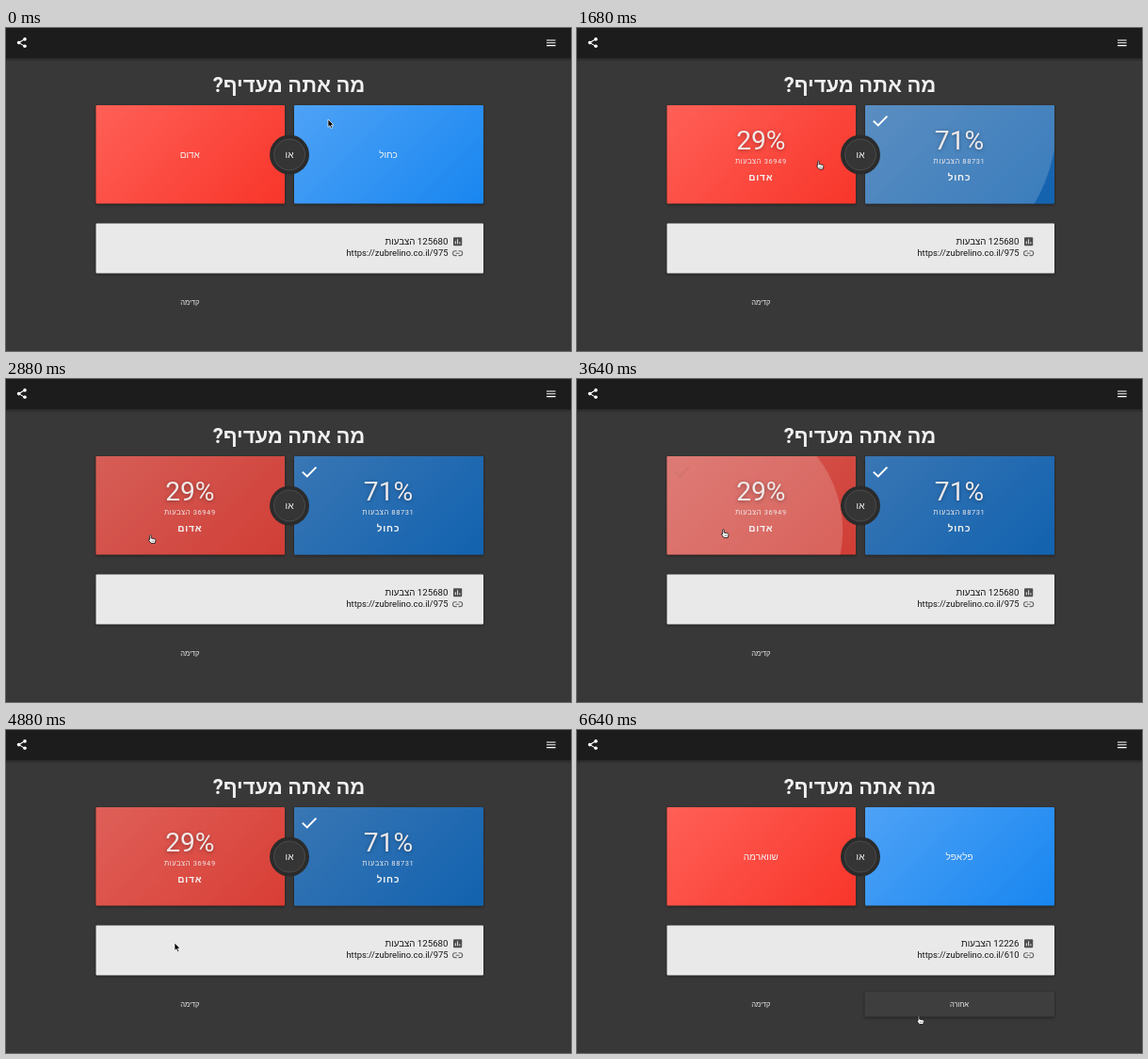
An HTML page that plays this animation: 600 px wide and 343 px high, repeating every 6.68 s.

```html
<!DOCTYPE html>
<html lang="he">
<head>
<meta charset="utf-8">
<style>
  html, body { margin: 0; width: 100%; height: 100%; overflow: hidden; background: #383838; }
  svg { display: block; width: 600px; height: 343px; }
  text { font-family: Roboto, "Open Sans", "Liberation Sans", sans-serif; fill: #fff; direction: rtl; text-anchor: middle; }
  .title { font-size: 22px; font-weight: 700; fill: #f0f0f0; }
  .plain { font-size: 10px; font-weight: 500; fill: #f4f4f4; }
  .bold { font-size: 10px; font-weight: 700; letter-spacing: .8px; fill: #f4f4f4; }
  .percent { font-size: 28.2px; direction: ltr; fill: #f0e9e9; filter: drop-shadow(0 1px 2px rgba(0,0,0,.35)); }
  .votes { font-size: 7.5px; letter-spacing: .6px; fill: #f0eaea; }
  .info { font-size: 9.7px; fill: #161616; text-anchor: start; }
  .link { font-size: 9.4px; direction: ltr; text-anchor: end; }
  .nav { font-size: 7.5px; fill: #eee; }
  .card { filter: drop-shadow(0 1px 1.5px rgba(0,0,0,.45)); }
</style>
</head>
<body>
<svg viewBox="0 0 600 343">
  <defs>
    <linearGradient id="redFill" gradientUnits="userSpaceOnUse" x1="119" y1="58" x2="272" y2="211">
      <stop offset="0" stop-color="#ff6057"/><stop offset="1" stop-color="#f8352a"/>
    </linearGradient>
    <linearGradient id="blueFill" gradientUnits="userSpaceOnUse" x1="330" y1="58" x2="483" y2="211">
      <stop offset="0" stop-color="#4ea2f6"/><stop offset="1" stop-color="#1886f0"/>
    </linearGradient>
    <linearGradient id="headShade" x2="0" y2="1">
      <stop offset="0" stop-opacity=".28"/><stop offset="1" stop-opacity="0"/>
    </linearGradient>
    <clipPath id="redClip"><rect x="95.5" y="82" width="200.5" height="104.5" rx="1"/></clipPath>
    <clipPath id="blueClip"><rect x="306" y="82" width="201" height="104.5" rx="1"/></clipPath>
  </defs>

  <rect width="600" height="343" fill="#383838"/>
  <rect y="32" width="600" height="4" fill="url(#headShade)"/>
  <rect width="600" height="32" fill="#1c1c1c"/>
  <g fill="#fff" stroke="#fff">
    <path d="M20 11.8 13.6 15.6 20 19.4" fill="none" stroke-width="1.1"/>
    <g stroke="none">
      <circle cx="20" cy="11.9" r="1.8"/><circle cx="13.6" cy="15.6" r="1.8"/><circle cx="20" cy="19.3" r="1.8"/>
    </g>
    <path d="M574 13h9.6M574 15.8h9.6M574 18.6h9.6" stroke-width="1.1"/>
  </g>
  <text class="title" x="300.5" y="68">מה אתה מעדיף?</text>

  <g id="cards"></g>

  <circle cx="301" cy="134.5" r="21" fill="#2b2b2b"/>
  <circle cx="301" cy="134.5" r="16.5" fill="#353535" stroke="#535353" stroke-width=".8"/>
  <text class="plain" x="301" y="138">או</text>

  <rect class="card" x="95.5" y="207.5" width="411.5" height="53" rx="1" fill="#e9e9e9"/>
  <text class="info" id="total" x="469.5" y="230"></text>
  <text class="info link" id="link" x="469.5" y="242"></text>
  <rect x="475" y="222.3" width="9.2" height="9" rx="1" fill="#4d4d4d"/>
  <path d="M477.3 229.3v-3M479.6 229.3v-5M481.9 229.3v-2" stroke="#e9e9e9"/>
  <path d="M478.7 236.8h-1.8a2.4 2.4 0 0 0 0 4.8h1.8M480.5 236.8h1.8a2.4 2.4 0 0 1 0 4.8h-1.8M477.6 239.2h4" fill="none" stroke="#666" stroke-width="1.1"/>

  <rect class="card" id="nextHover" x="95.5" y="278" width="200.5" height="26.5" rx="1" fill="#3e3e3e"/>
  <rect class="card" id="backHover" x="305.5" y="278" width="201.5" height="26.5" rx="1" fill="#3e3e3e"/>
  <text class="nav" x="195.3" y="294">קדימה</text>
  <text class="nav" id="back" x="406" y="294">אחורה</text>

  <g id="arrow">
    <path d="M0 0v8.3l1.9-1.7 1.3 2.9 1.5-.7-1.3-2.8h2.6z" fill="#000" stroke="#fff" stroke-width=".7"/>
  </g>
  <g id="hand">
    <path d="M-.8 .6q.8-1.1 1.5 0v3l4 .9q.9.4.7 1.5l-.7 3h-4.1l-2.7-3.5q-.2-1.2 1.3-.4z" fill="#fff" stroke="#111" stroke-width=".8"/>
    <path d="M1.6 6v1.6M3.3 6v1.6" stroke="#111" stroke-width=".5"/>
  </g>
</svg>

<script>
const LOOP = 6680, SWAP = 5400;
const $ = id => document.getElementById(id);
const clamp = v => Math.max(0, Math.min(1, v));
const smooth = v => (v = clamp(v), v * v * (3 - 2 * v));

// value of a track of [time, ...numbers] rows, eased between rows
function track(rows, t) {
  const i = rows.findIndex(r => r[0] > t);
  if (i < 0) return rows[rows.length - 1].slice(1);
  if (i === 0) return rows[0].slice(1);
  const a = rows[i - 1], b = rows[i];
  const k = smooth((t - a[0]) / (b[0] - a[0]));
  return a.slice(1).map((v, n) => v + (b[n + 1] - v) * k);
}

const pointer = [
  [0, 342, 97], [500, 337, 98], [1200, 337, 98], [1680, 256.5, 141],
  [2300, 166, 163], [2880, 153.5, 165.5], [3300, 155.5, 159.5], [4350, 155.5, 159.5],
  [4880, 179, 226], [5180, 196, 291], [5900, 196, 291], [6520, 363, 303.5]
];

const sides = [
  {
    id: 'red', x: 95.5, w: 200.5, mid: 195.3, names: ['אדום', 'שווארמה'],
    percent: '29%', votes: '36949 הצבעות', shade: '#5a5a5a',
    press: { at: 3300, x: 155.5, y: 161 },
    dim: [[1680, 0], [2100, .25], [4500, .25], [4900, .2], [SWAP, .2], [5800, 0]],
    wave: [[3300, .18], [4150, .18], [4950, 0]],
    tick: [[3450, 0], [3640, .12], [3850, 0]], tickColor: '#7d5552'
  },
  {
    id: 'blue', x: 306, w: 201, mid: 406, names: ['כחול', 'פלאפל'],
    percent: '71%', votes: '88731 הצבעות', shade: '#000',
    press: { at: 680, x: 337, y: 99 },
    dim: [[80, 0], [500, .15], [720, .16], [1300, .27], [SWAP, .27], [5800, 0]],
    wave: [[680, .18], [1720, .17], [2350, 0]],
    tick: [[980, 0], [1250, 1]], tickColor: '#fff'
  }
];

$('cards').innerHTML = sides.map(s => `
  <rect class="card" x="${s.x}" y="82" width="${s.w}" height="104.5" rx="1" fill="url(#${s.id}Fill)"/>
  <g clip-path="url(#${s.id}Clip)">
    <rect id="${s.id}Dim" x="${s.x}" y="82" width="${s.w}" height="104.5" fill="${s.shade}"/>
    <circle id="${s.id}Wave" cx="${s.press.x}" cy="${s.press.y}" fill="#fff"/>
  </g>
  <path id="${s.id}Tick" d="M${s.x + 8.8} 98.6l5 4.8 9.6-9.8" fill="none" stroke="${s.tickColor}" stroke-width="2"/>
  <text class="plain" id="${s.id}Name" x="${s.mid}" y="137.5"></text>
  <g id="${s.id}Score">
    <text class="percent" x="${s.mid}" y="128.6">${s.percent}</text>
    <text class="votes" x="${s.mid}" y="143.6">${s.votes}</text>
    <text class="bold" x="${s.mid}" y="161.5">${s.names[0]}</text>
  </g>`).join('');

const setText = (id, s) => { if ($(id).textContent !== s) $(id).textContent = s; };
const fade = (id, v) => $(id).setAttribute('opacity', v);

function drawSide(s, t) {
  const swapped = t >= SWAP;
  const score = swapped ? 0 : smooth((t - 700) / 180);
  const age = Math.max(0, t - s.press.at);
  fade(s.id + 'Dim', track(s.dim, t)[0]);
  fade(s.id + 'Wave', age ? track(s.wave, t)[0] : 0);
  $(s.id + 'Wave').setAttribute('r', 177 * (1 - Math.exp(-age / 271)));
  fade(s.id + 'Tick', swapped ? 0 : track(s.tick, t)[0]);
  setText(s.id + 'Name', s.names[+swapped]);
  fade(s.id + 'Name', 1 - score);
  fade(s.id + 'Score', score);
}

function draw(t) {
  const swapped = t >= SWAP;
  sides.forEach(s => drawSide(s, t));
  setText('total', swapped ? '12226 הצבעות' : '125680 הצבעות');
  setText('link', 'https://zubrelino.co.il/' + (swapped ? 610 : 975));
  fade('back', +swapped);

  const [x, y] = track(pointer, t);
  const inRow = (top, end) => y > top && y < end;
  const inCol = (left, end) => x > left && x < end;
  const onNext = inRow(278, 305) && inCol(95, 296);
  const onBack = swapped && inRow(278, 305) && inCol(305, 507);
  const onCard = inRow(82, 187) && (inCol(95, 296) || inCol(306, 507));
  const hand = t > 60 && (onNext || onBack || onCard);
  fade('nextHover', +onNext);
  fade('backHover', +onBack);
  fade('hand', +hand);
  fade('arrow', +!hand);
  for (const id of ['hand', 'arrow']) $(id).setAttribute('transform', `translate(${x} ${y})`);
}

const start = performance.now();
function tick() {
  draw((performance.now() - start) % LOOP);
  requestAnimationFrame(tick);
}
tick();
</script>
</body>
</html>
```
